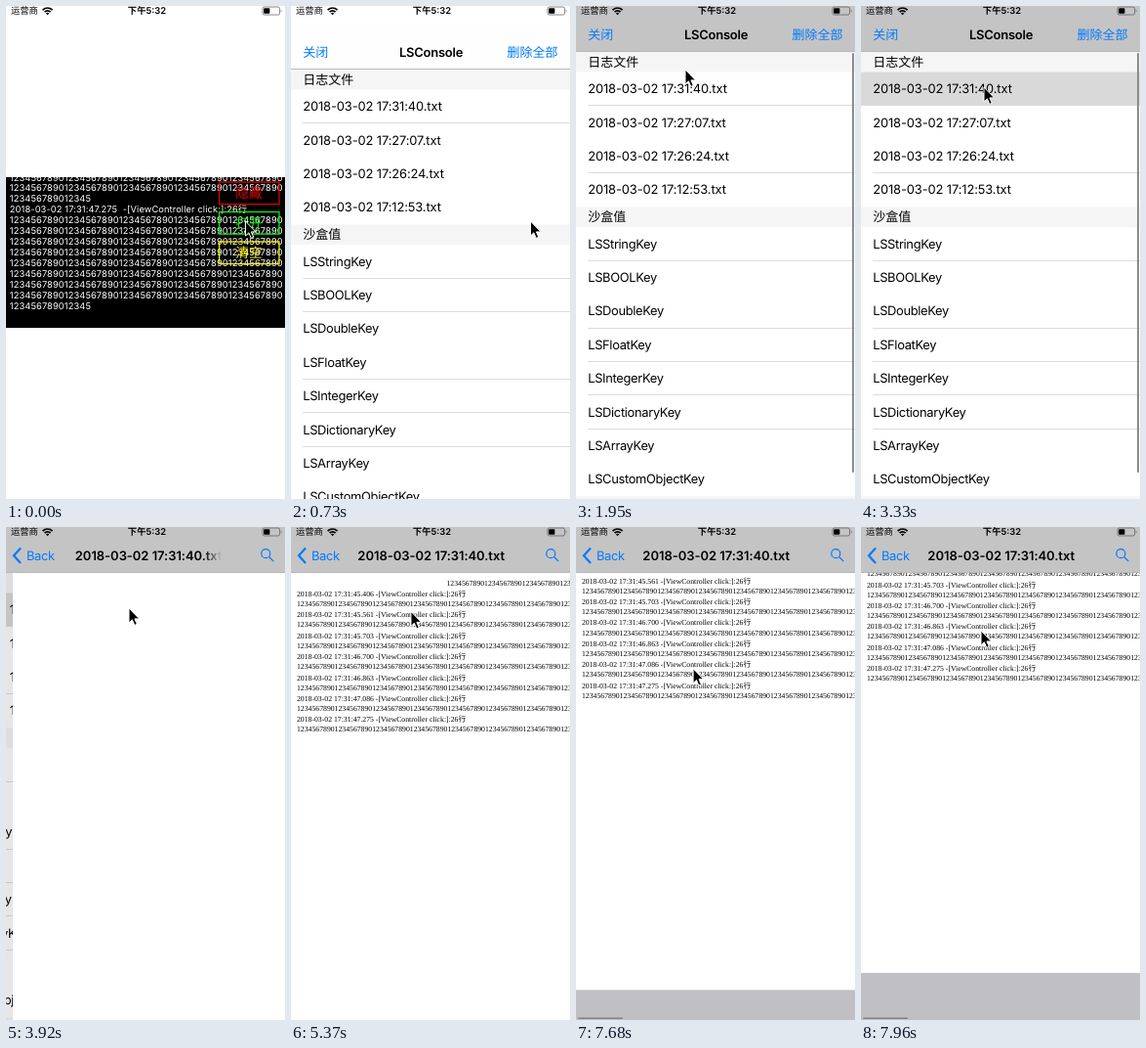
These frames come from a looping animation (286 by 504 pixels, 8000 ms). An HTML page:

```html
<!DOCTYPE html>
<html lang="zh">
<head>
<meta charset="utf-8">
<title>LSConsole</title>
<style>
html, body { margin: 0; width: 100%; height: 100%; overflow: hidden; background: #fff; }
svg { display: block; }
text {
  font-family: Inter, "Noto Sans CJK SC", "Noto Sans CJK", sans-serif;
  text-rendering: geometricPrecision;
  white-space: pre;
}
.row, .nav { font-size: 12.9px; letter-spacing: -.33px; }
.date { font-size: 12.9px; letter-spacing: -.11px; }
.head, .cjk { font-size: 13px; }
.title { font-size: 13px; font-weight: 600; letter-spacing: -.25px; }
.title.long { letter-spacing: -.05px; }
.log { font-size: 9.3px; letter-spacing: .1px; fill: #fff; }
.page { font: 7.72px "Liberation Serif", "Noto Sans CJK SC", "Noto Sans CJK", serif; }
.blue { fill: #007aff; }
</style>
</head>
<body>
<svg id="stage" width="286" height="504" viewBox="0 0 286 504">
  <defs>
    <linearGradient id="fade" gradientUnits="userSpaceOnUse" x1="203" x2="221" y1="0" y2="0">
      <stop stop-color="#fff"/><stop offset="1" stop-color="#000"/>
    </linearGradient>
    <mask id="cut" maskUnits="userSpaceOnUse" x="0" y="0" width="286" height="50">
      <rect width="286" height="50" fill="url(#fade)"/>
    </mask>
  </defs>
  <rect width="286" height="504" fill="#fff"/>
  <svg id="console" y="175" width="286" height="154"><rect width="286" height="154"/></svg>

  <g id="modal">
    <rect width="286" height="510" fill="#fff"/>
    <g id="list"></g>
    <rect id="dim" y="46" width="286" height="458"/>
    <g id="detail">
      <rect y="46" width="286" height="458" fill="#bfbfc4"/>
      <g id="page"><rect width="286" height="508" fill="#fff"/><g id="logs"></g></g>
      <rect id="hbar" x="2" y="501.5" width="46" height="1.6" rx=".8" fill="#808085"/>
    </g>
    <rect id="bar" width="286" height="46"/>
    <rect y="46" width="286" height="1" fill="#b8b8b8"/>
    <g id="navList"></g>
    <g id="navPage">
      <path d="M15 21.5 8 29.2 15 37" fill="none" stroke="#007aff" stroke-width="2.2"/>
      <g fill="none" stroke="#007aff" stroke-width="1.2">
        <circle cx="266.3" cy="27.2" r="4.5"/><path d="M269.6 30.5 274.3 35.2"/>
      </g>
    </g>
    <g id="titleBox"></g>
  </g>

  <g id="status">
    <g fill="none" stroke="#000" stroke-width="1.7">
      <path d="M37.6 4.1a7 7 0 0 1 10 0M39.6 6.2a4.2 4.2 0 0 1 6 0"/>
    </g>
    <path d="M42.6 9.3 40.9 7.6a2.4 2.4 0 0 1 3.4 0z"/>
    <rect x="263" y="1" width="17.6" height="8" rx="1.8" fill="none" stroke="#555" stroke-width=".7"/>
    <rect x="264.2" y="2.2" width="6.2" height="5.6" rx=".8"/>
    <path d="M281.8 3.6q1.6 1.4 0 2.8z" fill="#555"/>
  </g>
  <path id="cursor" d="M0 0V15L3.4 11.8 5.8 17.4 8.3 16.3 5.9 10.9H10.6Z"
    stroke="#fff" stroke-width="1" stroke-linejoin="round"/>
</svg>
<script>
const $ = id => document.getElementById(id);

function add(parent, tag, attrs, content) {
  const el = document.createElementNS("http://www.w3.org/2000/svg", tag);
  for (const k in attrs) el.setAttribute(k, attrs[k]);
  if (content) el.textContent = content;
  parent.appendChild(el);
  return el;
}

// y is the vertical middle of the line
const label = (parent, x, y, size, cls, content, more) =>
  add(parent, "text", { x, y: y + size * .36, class: cls, ...more }, content);

const digits = n => "1234567890".repeat(8).slice(0, n);
const stamp = (time, gap) => `2018-03-02 17:31:${time}${gap}-[ViewController click:]:26行`;

// status bar
label($("status"), 5, 5, 9.2, "", "运营商", { "font-size": 9.3 });
label($("status"), 144.5, 5, 9.2, "", "下午5:32",
  { "font-size": 9.4, "font-weight": 600, "text-anchor": "middle" });

// console overlay
const logLines = [digits(50), digits(50), digits(15), stamp("47.275", "  "),
  ...Array(8).fill(digits(50)), digits(15)];
logLines.forEach((s, i) => label($("console"), 3.8, .2 + i * 10.93, 9.3, "log", s));
[["隐藏", 5, "#e00000"], ["打开", 35.5, "#00f800"], ["清空", 66, "#f8f000"]].forEach(([s, y, color]) => {
  add($("console"), "rect", { x: 218.6, y, width: 61.4, height: 22.6, fill: "none", stroke: color, "stroke-width": 1.3 });
  label($("console"), 249, y + 11.5, 13.7, "", s,
    { "font-size": 13.7, "font-weight": 500, fill: color, "text-anchor": "middle" });
});

// list of files and keys; lines are seen "r" at rest, "m" while moving
const PITCH = 34.4;
const lines = [];
function section(top, name, rows, cls, shown) {
  add($("list"), "rect", { y: top, width: 286, height: 20.5, fill: "#f5f5f5" });
  label($("list"), 12.2, top + 10.2, 13, "head", name);
  rows.forEach((s, i) => {
    const y = top + 20.5 + i * PITCH;
    if (cls === "date" && i === 0)
      add($("list"), "rect", { id: "pick", y, width: 286, height: PITCH, fill: "#d9d9d9" });
    label($("list"), 12.2, y + 17, 12.9, cls, s);
    const el = add($("list"), "rect", { x: 12, y: Math.floor(y + PITCH), width: 274, height: 1, fill: "#dcdcdc" });
    lines.push([el, shown[i] || ""]);
  });
}
section(47, "日志文件", ["31:40", "27:07", "26:24", "12:53"].map(s => `2018-03-02 17:${s}.txt`),
  "date", ["rm", "", "r", ""]);
section(205.4, "沙盒值", ["String", "BOOL", "Double", "Float", "Integer", "Dictionary", "Array", "CustomObject"]
  .map(s => `LS${s}Key`), "row", ["rm", "m", "r", "rm", "rm", "rm"]);
add($("list"), "rect", { y: 501.3, width: 286, height: 9, fill: "#f5f5f5" });
add($("list"), "rect", { id: "vbar", x: 283, y: 48, width: 2, height: 429, rx: .8, fill: "#8c8c8c" });

// navigation bar
label($("navList"), 12.2, 29, 13, "cjk blue", "关闭");
label($("navList"), 273.5, 29, 13, "cjk blue", "删除全部", { "text-anchor": "end" });
const oldTitle = label($("navList"), 143.5, 29, 13, "title", "LSConsole", { "text-anchor": "middle" });
label($("navPage"), 21, 29, 13, "nav blue", "Back");
const newTitle = label($("titleBox"), 143.7, 29, 13, "title long", "2018-03-02 17:31:40.txt", { "text-anchor": "middle" });

// log file page
label($("logs"), 159.5, 57, 7.7, "page", digits(33));
["45.406", "45.561", "45.703", "46.700", "46.863", "47.086", "47.275"].forEach((s, i) => {
  const y = 68.1 + i * 21.42;
  label($("logs"), 6, y, 7.7, "page", stamp(s, " "));
  label($("logs"), 6, y + 10.1, 7.7, "page", digits(74));
});

// pointer: time, x, y
const path = [
  [0, 245.5, 220], [1290, 245.5, 220], [1790, 112, 66], [1950, 112, 65], [2740, 122, 80],
  [3040, 126, 83], [5300, 126, 83], [5600, 104, 108], [6130, 37, 62], [6500, 30, 41],
  [6820, 33, 40.5], [7020, 88, 129], [7330, 115, 213], [7920, 123, 106], [8000, 123, 106]
];
const PRESS = 7330, PRESS_Y = 213;

const clamp = v => Math.max(0, Math.min(1, v));
const smooth = p => p * p * (3 - 2 * p);
const easeOut = p => 1 - (1 - p) ** 3;

function pointer(t) {
  const i = Math.max(1, path.findIndex(k => k[0] > t));
  const [t0, x0, y0] = path[i - 1], [t1, x1, y1] = path[i];
  const p = smooth((t - t0) / (t1 - t0));
  return [x0 + (x1 - x0) * p, y0 + (y1 - y0) * p];
}

// pull past the end of the page
const rubber = d => 458 * (1 - 1 / (d * .55 / 458 + 1));

const move = (el, x, y) => el.setAttribute("transform", `translate(${x.toFixed(2)} ${y.toFixed(2)})`);
const alpha = (el, v) => el.setAttribute("opacity", v);

function draw(t) {
  const rise = easeOut(clamp((t - 150) / 860));
  const push = easeOut(clamp((t - 3480) / 620));
  const [x, y] = pointer(t);
  const pull = t > PRESS ? rubber(Math.max(0, PRESS_Y - y)) : 0;

  // whole pixels keep the thin lines sharp
  move($("modal"), 0, t < 950 ? Math.ceil(504 * (1 - rise)) : 0);
  alpha($("modal"), t < 150 ? 0 : 1);
  $("bar").setAttribute("fill", t < 950 ? "#fefefe" : t < 1010 ? "#dadada" : "#c4c4c4");
  lines.forEach(([el, shown]) => alpha(el, shown.includes(t < 950 ? "m" : "r") ? 1 : 0));
  alpha($("vbar"), t < 950 ? 0 : 1);
  alpha($("pick"), t < 3330 ? 0 : 1);

  move($("list"), -86 * push, 0);
  alpha($("dim"), .1 * push);
  move($("detail"), 286 * (1 - push), 0);
  alpha($("navList"), clamp(1 - push * 1.6));
  move(oldTitle, -100 * push, 0);
  alpha($("navPage"), clamp(push * 1.6 - .5));
  alpha(newTitle, clamp(push * 1.6 - .3));
  move(newTitle, 100 * (1 - push), 0);
  if (t < 4100) $("titleBox").setAttribute("mask", "url(#cut)");
  else $("titleBox").removeAttribute("mask");

  alpha($("logs"), t < 4160 ? 0 : 1);
  move($("page"), 0, -pull);
  alpha($("hbar"), t < 4160 ? 0 : t < PRESS ? clamp((4500 - t) / 340) : 1);
  move($("cursor"), x, y);
}

let start;
function tick(now) {
  start ??= now;
  draw((now - start) % 8000);
  requestAnimationFrame(tick);
}
draw(0);
requestAnimationFrame(tick);
</script>
</body>
</html>
```
